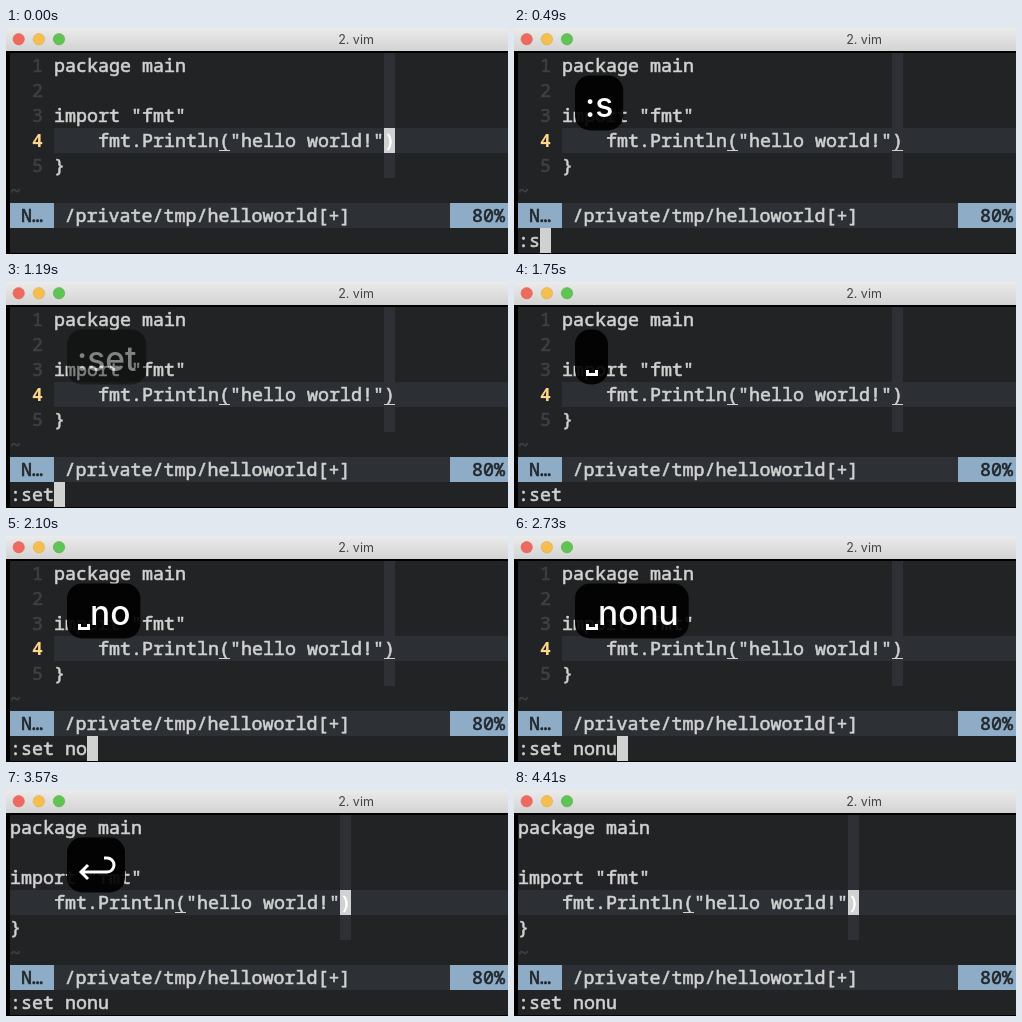
Animation, 502 px wide and 226 px high, one loop 4620 ms. Source, as an HTML page:

```html
<!DOCTYPE html>
<html lang="en">
<head>
<meta charset="utf-8">
<title>Vim</title>
<style>
  html, body { margin: 0; width: 100%; height: 100%; overflow: hidden; background: #000; }
  svg { display: block; }
  text { white-space: pre; }
  .mono { font: 18.333px "Noto Sans Mono", "DejaVu Sans Mono", monospace; color: #d0d1d0; }
  .mono text { fill: currentColor; stroke: currentColor; stroke-width: .6; }
  .mono .dim { color: #3e4144; }
  .mono .now { color: #ffd68a; font-weight: 700; stroke: none; }
  .mono .dark { color: #20262c; }
  .title { font: 12.5px Inter, "Liberation Sans", sans-serif; fill: #454545; }
  .key { font: 500 33.5px Inter, "Liberation Sans", sans-serif; fill: #fff; }
  .glyph { fill: none; stroke: #fff; stroke-width: 3; }
</style>
</head>
<body>
<svg width="502" height="226" viewBox="0 0 502 226">
  <defs>
    <linearGradient id="bar" x2="0" y2="1">
      <stop stop-color="#ebebeb"/><stop offset="1" stop-color="#d3d3d3"/>
    </linearGradient>
  </defs>

  <rect width="502" height="226" fill="#000"/>
  <rect width="502" height="23" fill="url(#bar)"/>
  <g stroke-width=".5">
    <circle cx="12.7" cy="11.2" r="5.7" fill="#ee6a5e" stroke="#d55c51"/>
    <circle cx="32.9" cy="11.2" r="5.7" fill="#f5be4e" stroke="#d8a243"/>
    <circle cx="53" cy="11.2" r="5.7" fill="#5fc453" stroke="#52a945"/>
  </g>
  <text class="title" x="350" y="15.5" text-anchor="middle">2. vim</text>

  <rect x="4" y="25" width="498" height="200" fill="#212324"/>
  <rect id="line" y="100" height="25" fill="#2c3034"/>
  <rect x="4" y="175" width="498" height="25" fill="#2d3136"/>
  <rect x="4" y="175" width="44" height="25" fill="#8eacc5"/>
  <rect x="444" y="175" width="58" height="25" fill="#8eacc5"/>

  <g class="mono">
    <g id="numbers"></g>
    <g id="code">
      <rect x="330" y="25" width="11" height="125" fill="#2e3036"/>
      <rect id="caret" x="330" y="100" width="11" height="25" fill="#d0d1d1"/>
      <text y="44">package main</text>
      <text y="94">import "fmt"</text>
      <text y="119">    fmt.Println("hello world!"<tspan id="paren">)</tspan></text>
      <text y="144">}</text>
      <path stroke="#d0d1d0" d="M165 122.5h11"/>
      <path id="matchEnd" stroke="#d0d1d0" d="M330 122.5h11"/>
    </g>
    <text class="dim" x="4" y="169">~</text>
    <text class="dark" x="15" y="194">N…</text>
    <text x="58.5" y="194">/private/tmp/helloworld[+]</text>
    <text class="dark" x="466" y="194">80%</text>
    <text id="command" x="4" y="219"></text>
    <rect id="prompt" y="200" width="11" height="25" fill="#d0d1d1"/>
  </g>

  <g id="bubble">
    <rect id="box" x="61" y="47.5" height="55" rx="15" fill="#000" fill-opacity=".92"/>
    <path id="space" class="glyph" d="M73.5 88v4.5h9v-4.5"/>
    <path id="enter" class="glyph" d="M98 68h3a7 7 0 0 1 0 14H75m7-7l-7 7l7 7"/>
    <text id="keys" class="key" y="89"></text>
  </g>
</svg>

<script>
const LOOP = 4620, STEP = 70, CELL = 11, LEFT = 4;
const RUN = 3360;                 // Enter is pressed
const FADE = [.98, .8, .43, .15];
const FADE_DELAY = 350;

const $ = id => document.getElementById(id);
const show = (id, on) => $(id).style.display = on ? "" : "none";
const set = (id, attrs) => {
  for (const k in attrs) $(id).setAttribute(k, attrs[k]);
};

// [time, command line, key caption]
const typed = [
  [350, ":", ":"],
  [490, ":s", ":s"],
  [560, ":se", ":se"],
  [700, ":set", ":set"],
  [1610, ":set ", "␣"],
  [1890, ":set n", "␣n"],
  [2030, ":set no", "␣no"],
  [2170, ":set non", "␣non"],
  [2380, ":set nonu", "␣nonu"],
  [RUN, ":set nonu", "↩"]
];

for (let n = 1; n <= 5; n++) {
  $("numbers").innerHTML +=
    `<text class="${n === 4 ? "now" : "dim"}" x="26" y="${19 + 25 * n}">${n}</text>`;
}

function drawBubble(t, time, caption) {
  const late = t - time - FADE_DELAY;
  const alpha = late < 0 ? 1 : FADE[Math.floor(late / STEP)] || 0;
  show("bubble", alpha > 0);
  if (!alpha) return;

  const space = caption[0] === "␣", enter = caption === "↩";
  const letters = space ? caption.slice(1) : enter ? "" : caption;
  const start = space ? 84 : 71;
  $("keys").textContent = letters;
  const textWidth = letters ? $("keys").getComputedTextLength() : 0;
  set("keys", { x: start });
  set("box", { width: enter ? 58 : start + textWidth + 10 - 61 });
  set("bubble", { opacity: alpha });
  show("space", space);
  show("enter", enter);
}

function draw(t) {
  const last = typed.filter(k => k[0] <= t).pop() || [-LOOP, "", ""];
  const [time, command, caption] = last;
  const done = t >= RUN;
  const prompting = command && !done;
  const normal = !prompting;
  const x = done ? LEFT : LEFT + 4 * CELL;

  show("numbers", !done);
  set("code", { transform: `translate(${x})` });
  set("line", { x, width: 502 - x });

  show("caret", normal);
  show("matchEnd", !normal);
  set("paren", { color: normal ? "#fff" : "#d0d1d0" });

  $("command").textContent = command;
  show("prompt", prompting && !(t >= 1540 && t < 1890));
  set("prompt", { x: LEFT + command.length * CELL });

  drawBubble(t, time, caption);
}

function frame(now) {
  draw(Math.floor(now % LOOP / STEP) * STEP);
  requestAnimationFrame(frame);
}

draw(0);
requestAnimationFrame(frame);
</script>
</body>
</html>
```
